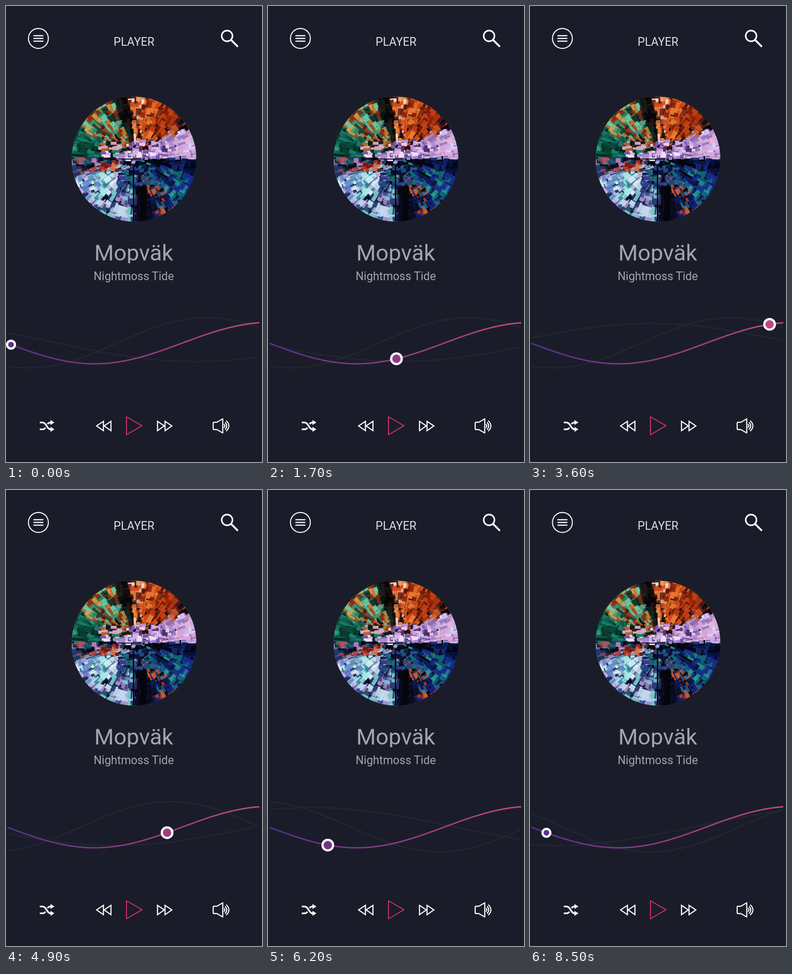
These frames come from a looping animation (561x998 px, 8.6 s). An HTML page with a canvas:

```html
<!DOCTYPE html>
<html lang="en">
<head>
<meta charset="utf-8">
<title>Player</title>
<style>
  html, body { margin: 0; width: 100%; height: 100%; overflow: hidden; background: #1a1d29; }
  svg, canvas { position: absolute; left: 0; top: 0; }
  text { font-family: Roboto, sans-serif; text-anchor: middle; }
</style>
</head>
<body>
<canvas id="cover" width="561" height="998"></canvas>
<svg width="561" height="998" viewBox="0 0 561 998" fill="none" stroke-linejoin="round">
  <defs>
    <linearGradient id="tone" gradientUnits="userSpaceOnUse" x1="0" x2="557" y1="0" y2="0">
      <stop stop-color="#582f8c"/><stop offset="1" stop-color="#c4497a"/>
    </linearGradient>
  </defs>

  <g stroke="#fff" stroke-linecap="round">
    <circle cx="71" cy="71" r="21.800" stroke-width="2.200"/>
    <path d="M61 65H81M61 71H81M61 77H81" stroke-width="2.400"/>
    <circle cx="484.500" cy="65.500" r="11.800" stroke-width="3.400"/>
    <path d="M493.500 74.500L507 88" stroke-width="4"/>
  </g>

  <text x="280.500" y="87" font-size="25" fill="#dedfe3">PLAYER</text>
  <text x="280" y="557" font-size="49" fill="#a3a5ac">Mopväk</text>
  <rect y="563" width="561" height="10" fill="#1a1d29"/>
  <text x="280" y="600" font-size="25" fill="#a3a5ac">Nightmoss Tide</text>

  <g stroke="#222631" stroke-width="3" stroke-linecap="round">
    <path id="shortWave"/><path id="longWave"/>
  </g>
  <path id="track" stroke="url(#tone)" stroke-width="3"/>
  <circle id="knob" stroke="#fff" stroke-width="4.800"/>

  <g stroke="#fff" stroke-width="2.400" stroke-linejoin="miter">
    <path d="M74 911.500H80C89 911.500 89 926.500 98 926.500H100M74 926.500H80Q84 926.500 86.500 923M91 915Q93.500 911.500 98 911.500H100" stroke-width="3.500"/>
    <path d="M97.500 906L106 911.500L97.500 917ZM97.500 921L106 926.500L97.500 932Z" fill="#fff" stroke="none"/>
    <path d="M213.500 909V929.500L198.500 919ZM230 909V929.500L215 919Z"/>
    <path d="M332 909V929.500L347 919ZM348.500 909V929.500L363.500 919Z"/>
    <path d="M456 911H462L475 903.500V934.500L462 927H456Q454 927 454 925V913Q454 911 456 911Z" stroke-linejoin="round"/>
    <path d="M477.500 915Q481.500 919 477.500 923M480 911Q487.500 919 480 927M482.500 907.500Q494.500 919 482.500 930.500" stroke-width="2.300"/>
  </g>
  <path d="M264 899L298 918.700L264 938.500Z" stroke="#d6336c" stroke-width="2"/>
</svg>

<script>
const $ = id => document.getElementById(id);
const LOOP = 8600, STEP = 100;

// Pairs of time and value, joined by monotone cubic curves.
const knobX = [[0, 11], [1700, 281.5], [3300, 530], [3600, 525], [4900, 353], [6200, 131], [7200, 31], [7300, 32.5], [7700, 32.5], [8500, 36]];
const knobR = [[0, 8.6], [300, 11.6], [6900, 11.6], [7300, 8.6]];
const shortCrest = [[0, 440], [3600, 440], [4900, 360], [6200, -15], [7300, -125]];
const longCrest = [[0, 1034], [1700, 909], [3600, 265], [4900, -381], [6200, -1143], [7300, -1804]];

function valueAt(keys, t) {
  const last = keys.length - 1;
  if (t >= keys[last][0]) return keys[last][1];
  let i = 0;
  while (t >= keys[i + 1][0]) i++;
  const rate = n => (keys[n + 1][1] - keys[n][1]) / (keys[n + 1][0] - keys[n][0]);
  const slope = n => {
    if (n === 0 || n === last) return 0;
    const a = rate(n - 1), b = rate(n);
    return a * b > 0 ? 2 * a * b / (a + b) : 0;
  };
  const [t0, v0] = keys[i], [t1, v1] = keys[i + 1];
  const d = t1 - t0, u = (t - t0) / d, w = 1 - u;
  return w * w * ((1 + 2 * u) * v0 + u * d * slope(i)) + u * u * ((1 + 2 * w) * v1 - w * d * slope(i + 1));
}

const wave = (mid, height, half, crest) => x => mid - height * Math.cos(Math.PI * (x - crest) / half);
const trackY = wave(737.8, 45.3, 384, 578);

function curve(y, from, to) {
  let d = "";
  for (let x = from; x <= to; x += 6) d += (d ? "L" : "M") + x + " " + y(x).toFixed(2);
  return d;
}

function toneAt(x) {
  const mix = (a, b) => Math.round(a + (b - a) * x / 557);
  return `rgb(${mix(88, 196)},${mix(47, 73)},${mix(140, 122)})`;
}

// Cover: seeded blocks fanning out from a vanishing point, coloured by direction.
function drawCover() {
  const ctx = $("cover").getContext("2d");
  let seed = 11;
  const random = () => (seed = seed * 16807 % 2147483647) / 2147483647;
  const sectors = [
    [-152, "#0c5a4a #16806a #0a3b30 #05120f #2fa080"],
    [-112, "#2f9a78 #c8702a #0d4a3c #d8a050 #6fc8a4 #8d2a10 #101818"],
    [-97, "#050608 #0d2a26 #3a1208 #08090c"],
    [-80, "#f0e0d0 #d2481a #401008 #e88a4a #9a2a0e"],
    [-45, "#d2481a #8a1f0a #e87a30 #4a1208 #c8400e"],
    [-32, "#0a0508 #8a2a10 #3a1a30 #d05a28 #b898c8"],
    [0, "#d9a8e0 #b38ad0 #f4e4f8 #8a6fc0 #d8c8f4 #e4b4dc"],
    [18, "#06123f #0c1f66 #04060f #142a78"],
    [50, "#14308a #0f6a7a #1a2c90 #0a0f30 #101c60 #2a9a98"],
    [72, "#14207a #b83a1c #0a1a50 #05060c #2a70a0 #d05a30"],
    [90, "#05060c #0a0a1c #10123c"],
    [130, "#a890d0 #70c8c8 #0a1030 #24408a #c8d8f0 #3a3a70"],
    [162, "#a8e8e8 #c0a8e0 #6a8ad0 #d8f0f4 #3a9aa0 #182860"],
    [181, "#b04050 #c890c0 #0a0c18 #143a70 #1f7a70"]
  ].map(([end, list]) => [end, list.split(" ")]);

  ctx.beginPath();
  ctx.arc(280.5, 335, 136.5, 0, 7);
  ctx.clip();
  ctx.fillStyle = "#05070d";
  ctx.fillRect(140, 195, 281, 280);
  ctx.translate(286, 334);
  for (let i = 0; i < 2000; i++) {
    const angle = random() * 360 - 180;
    const colors = sectors.find(s => angle < s[0])[1];
    const r = 155 * Math.sqrt(1 - i / 2000) + random() * 8;
    ctx.save();
    ctx.rotate(angle * Math.PI / 180);
    ctx.fillStyle = colors[Math.floor(random() * colors.length)];
    ctx.globalAlpha = 0.6 + random() * 0.4;
    const length = 6 + r * 0.26 * random(), width = 4 + r * 0.11 * random();
    ctx.fillRect(r - length / 2, -width / 2, length, width);
    ctx.restore();
  }
  const scatter = (x, y, w, h, n, colors) => {
    for (let i = 0; i < n; i++) {
      ctx.fillStyle = colors[i % colors.length];
      ctx.fillRect(x + random() * w, y + random() * h, 4 + random() * 11, 3 + random() * 7);
    }
  };
  scatter(-84, -42, 60, 22, 26, ["#b8602c", "#d8a0b8", "#10181c", "#8a3a20", "#c8b0d8"]);
  scatter(-30, -42, 90, 30, 50, ["#b890d4", "#7a5ab0", "#e8c8ec", "#4a3070", "#d0a8dc"]);
  scatter(-82, -18, 130, 15, 60, ["#d9b0e4", "#a888d0", "#f0dcf4", "#6a5aa8"]);
  scatter(-82, 4, 38, 22, 18, ["#b83a24", "#d8704a", "#701c18"]);
  scatter(-42, 12, 82, 44, 65, ["#14205c", "#1a4a80", "#0a1238", "#3a3a90", "#176a72"]);
  ctx.fillStyle = "#04060c";
  ctx.fillRect(-8, 20, 3, 120);
  ctx.fillRect(8, 60, 14, 80);
  ctx.fillRect(-80, 0, 90, 2);
}

function render(now) {
  const t = Math.floor(now % LOOP / STEP) * STEP;
  const x = valueAt(knobX, t), knob = $("knob");
  knob.setAttribute("cx", x);
  knob.setAttribute("cy", trackY(x));
  knob.setAttribute("r", valueAt(knobR, t));
  knob.setAttribute("fill", toneAt(x));
  $("shortWave").setAttribute("d", curve(wave(737, 55, 390, valueAt(shortCrest, t)), 5, 555));
  $("longWave").setAttribute("d", curve(wave(736.5, 41.5, 619, valueAt(longCrest, t)), 5, 555));
}

drawCover();
$("track").setAttribute("d", curve(trackY, 3, 557));
const start = performance.now();
(function tick() {
  render(performance.now() - start);
  requestAnimationFrame(tick);
})();
</script>
</body>
</html>
```
